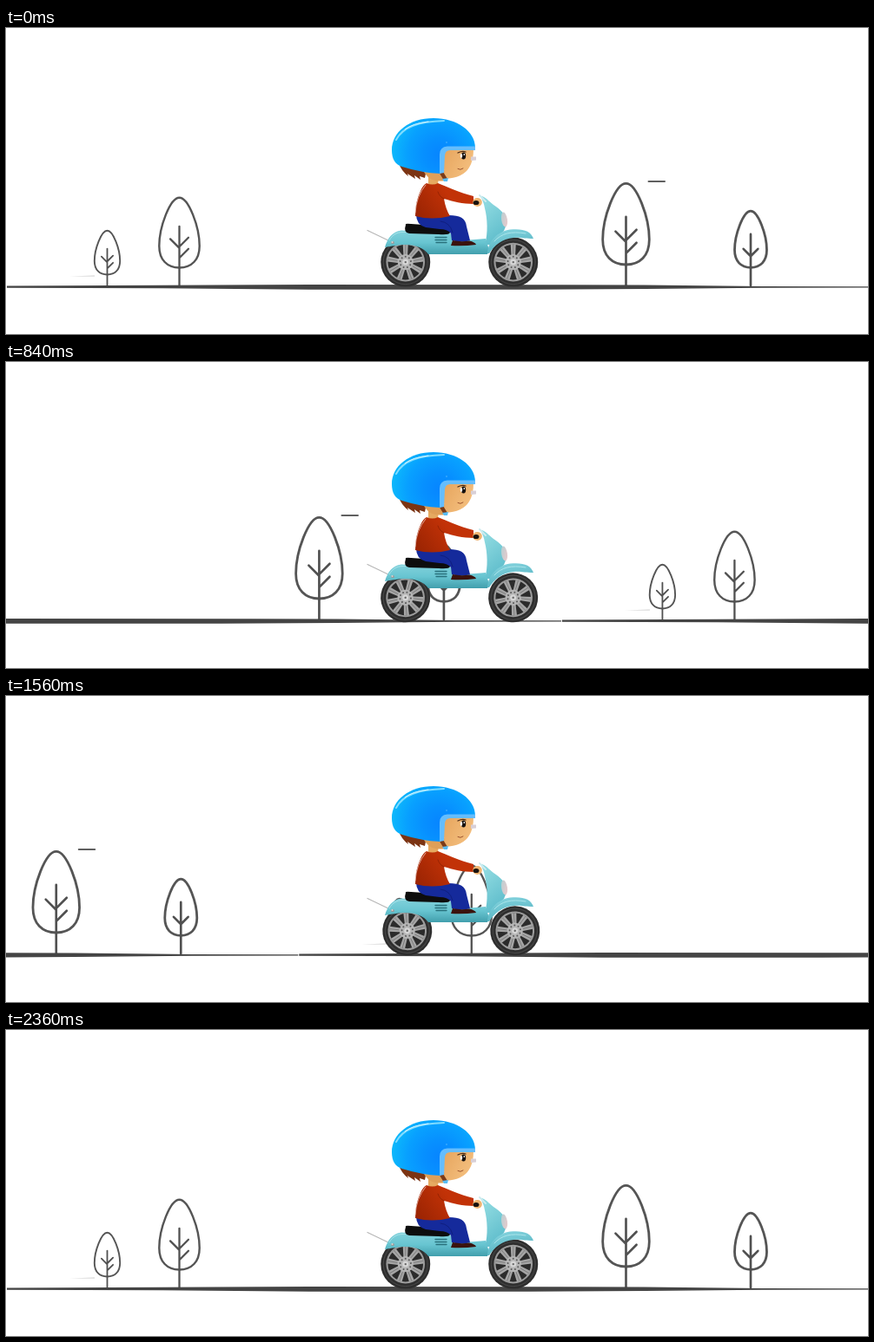
An HTML page with a canvas that plays this animation: 992x353 px, repeating every 2.4 s.

```html
<!DOCTYPE html>
<html lang="en">
<head>
<meta charset="utf-8">
<title>Scooter ride</title>
<style>
  html, body { margin: 0; width: 100%; height: 100%; overflow: hidden; background: #fff; }
  canvas { display: block; }
</style>
</head>
<body>
<canvas id="stage" width="992" height="353"></canvas>
<script>
const ctx = document.getElementById('stage').getContext('2d');
const WIDTH = 992, HEIGHT = 353, LOOP = 2400, STEP = 40;
const LAST = LOOP / STEP - 1;

function fill(path, style) {
  ctx.fillStyle = style;
  ctx.fill(new Path2D(path));
}

function stroke(path, style, width) {
  ctx.strokeStyle = style;
  ctx.lineWidth = width;
  ctx.stroke(new Path2D(path));
}

function ellipse(x, y, rx, ry, style, angle = 0) {
  ctx.fillStyle = style;
  ctx.beginPath();
  ctx.ellipse(x, y, rx, ry, angle, 0, Math.PI * 2);
  ctx.fill();
}

function addStops(gradient, colors) {
  colors.forEach((c, i) => gradient.addColorStop(i / (colors.length - 1), c));
  return gradient;
}

const linear = (x0, y0, x1, y1, ...colors) =>
  addStops(ctx.createLinearGradient(x0, y0, x1, y1), colors);
const radial = (x, y, r, ...colors) =>
  addStops(ctx.createRadialGradient(x, y, 0, x, y, r), colors);

const paint = {
  helmet: radial(499, 146, 56, '#0785ff', '#0790ff', '#08a0ff', '#0cb9fb'),
  skin: linear(504, 145, 538, 165, '#e7a760', '#f5c181'),
  shirt: linear(474, 212, 506, 188, '#9d2503', '#c23207'),
  body: linear(0, 233, 0, 262, '#83d2dc', '#68c5d1', '#3f9caa'),
  shield: linear(550, 205, 575, 235, '#8cd8df', '#62bfcd'),
  fender: linear(570, 233, 575, 260, '#82d2dd', '#55b3c1'),
  lamp: linear(569, 220, 579, 222, '#b9cfd2', '#ecc9cb')
};

// Twigs are [side, height of the joint as a share of the crown].
const uneven = [[1, 0.7], [-1, 0.72], [1, 0.86]];
const even = [[1, 0.8], [-1, 0.8]];
const trees = [
  { x: 713.5, top: 179.3, bottom: 273, half: 26.8, line: 2.8, twigs: uneven },
  { x: 199.5, top: 195.7, bottom: 276.5, half: 23.2, line: 2.4, twigs: uneven },
  { x: 857, top: 211.2, bottom: 276.3, half: 18.5, line: 2.8, twigs: even },
  { x: 116.5, top: 233.7, bottom: 284.5, half: 14.7, line: 1.9, twigs: uneven }
];

function drawTree({ x, top, bottom, half, line, twigs }) {
  const h = bottom - top, wide = top + h * 0.69;
  const side = s => `M${x} ${top}C${x + s * half * 0.46} ${top} ${x + s * half} ${top + h * 0.42} ` +
    `${x + s * half} ${wide}C${x + s * half} ${top + h * 0.89} ${x + s * half * 0.6} ${bottom} ${x} ${bottom}`;
  const twig = ([s, y]) => `M${x} ${top + h * y}L${x + s * half * 0.45} ${top + h * (y - 0.13)}`;
  stroke(side(-1) + side(1), '#555', line);
  stroke(`M${x} ${top + h * 0.41}V297` + twigs.map(twig).join(''), '#505050', line * 0.95);
}

function drawScenery() {
  trees.forEach(drawTree);
  fill('M73 286.5L102 285.5V286.6Z', '#ccc');
  fill('M1 297.4L180 296.7L350 296L640 296.2L735 296.6L870 298L992 298.3V299.4L870 299.7' +
    'L735 301L600 301.7L350 301.7L180 300.2L1 299.8Z', '#444');
}

function drawWheel(x, y, angle) {
  ctx.save();
  ctx.translate(x, y);
  ctx.rotate(angle);
  ellipse(0, 0, 28.5, 28.5, '#2e2e2e');
  ctx.lineWidth = 1;
  ctx.strokeStyle = '#484848';
  ctx.beginPath();
  ctx.arc(0, 0, 25.5, 0, Math.PI * 2);
  ctx.stroke();
  ellipse(0, 0, 22.3, 22.3, '#9c9c9c');
  ellipse(0, 0, 20.3, 20.3, '#2b2b2b');
  for (let i = 0; i < 9; i++) {
    fill('M-2.2 -5L-3 -20.5H3L2.2 -5Z', '#a6a6a6');
    stroke('M0 -10V-20', '#777', 0.8);
    ctx.rotate(Math.PI * 2 / 9);
  }
  ellipse(0, 0, 9, 9, '#b5b5b5');
  for (let i = 0; i < 9; i++) {
    ellipse(0, -6.3, 1, 1, '#5a5a5a');
    ctx.rotate(Math.PI * 2 / 9);
  }
  ellipse(0, 0, 3.5, 3.5, '#d6d6d6');
  ellipse(0, 0, 1.2, 1.2, '#666');
  ctx.restore();
}

function drawScooter() {
  stroke('M416 233.5L444 247', '#b8b8b8', 1.3);
  fill('M436 253C439 243 444 235 455 233.5L512 237L515 246L552 243L556 256L554 261H486' +
    'C481 254 472 250 460 250C450 250 444 252 436 253Z', paint.body);
  stroke('M441 245C446 237 451 235 460 235.5', '#a6e2e8', 1);
  fill('M546 194C550 193 555 199 561 204C569 209 575 215 577 224L573 234L557 250H551' +
    'C555 237 554 219 551 208C550 202 548 198 546 194Z', paint.shield);
  fill('M554 260C555 246 565 235 580 232.5C595 231 604 234 607 243C597 243 592 241 584 242' +
    'C571 243 562 251 556 260Z', paint.fender);
  stroke('M562 246C570 237 581 234 598 237', '#abe5eb', 1);
  ellipse(573.5, 221, 3.4, 8.5, paint.lamp, -0.15);
  stroke('M545 193L552 200', '#cdebef', 2);
  stroke('M494 241.5H507M494 244.5H507M495 247.5H507', '#28717c', 1.3);
  ellipse(445, 247.5, 2, 1.6, '#999');
  ellipse(444.5, 247, 1, 0.8, '#eee');
}

function drawRider() {
  fill('M460 227Q459 225 466 226L511 229V236Q510 239 498 238L464 237Q457 236 460 227Z', '#0d0d0d');
  fill('M472 215L510 216C522 216 529 219 530 229L534 245Q524 248 513 245L512 237' +
    'Q508 232 499 232L483 230Q472 227 472 215Z', '#152a9b');
  stroke('M500 223Q511 224 514 236', '#0e1c78', 0.8);
  fill('M514 245Q523 247 533 245.5Q540 247 541 250Q526 252 512 251Z', '#3b130e');

  fill('M486 171H498L497 181H486Z', '#e6a960');
  fill('M484 179Q491 182 497 179C508 183 521 190 538 194V203C526 203 514 200 504 197' +
    'Q506 209 511 217Q490 222 471 217Q471 200 477 188Q480 181 484 179Z', paint.shirt);
  stroke('M471 213Q472 194 483 181', '#e9c3bb', 0.8);
  stroke('M497 189Q499 195 504 197', '#8d2002', 0.8);
  ellipse(542.5, 201, 5.3, 5, '#efb471');
  ellipse(541, 201.5, 3.4, 2.6, '#18120f');
}

function drawHead() {
  fill('M452 156L484 163L482 173L476 171L477 175L470 170L471 174L462 168L463 171Q455 165 452 156Z', '#7c3413');
  fill('M480 164H505V176Q487 179 480 164Z', '#df9f58');
  fill('M502 140H538Q538 153 533 161Q526 173 505 174Z', paint.skin);
  fill('M535 148.5H541V152.5L535 153Z', '#d9d0d7');
  fill('M498 166L503 166L508 174L504 176Z', '#7b3b18');
  fill('M502 174L509 173L508 177H504Z', '#58bdf4');

  fill('M540 138C540 119 519 104 492 104C464 104 444 120 444 141C444 151 448 158 456 160' +
    'Q478 167 500 168L502 142L507 138Z', paint.helmet);
  fill('M540 136.5V141H511Q505.5 141 505 147L504 167L499 168V146Q499 137 508 136.5Z', '#65bdfd');
  stroke('M449 129C457 114 474 108 504 107', '#7fdcff', 2);
  stroke('M459 117Q468 110 486 108', '#d4f5ff', 1);
  ellipse(507, 132, 0.8, 0.8, '#58baff');

  stroke('M520 144Q525 141.5 529 143', '#4c2b16', 1.3);
  ellipse(526.5, 147.5, 2.7, 4, '#16100e');
  ellipse(524, 147.5, 1.2, 2.4, '#fff');
  ellipse(527.3, 146, 0.8, 1, '#fff');
  stroke('M520 162.5Q523 164.5 526 162', '#9c5430', 1);
}

function draw(now) {
  const step = Math.floor((now % LOOP) / STEP);
  const phase = step / LAST;
  const shift = phase * WIDTH;
  const angle = phase * Math.PI * 4;

  ctx.fillStyle = '#fff';
  ctx.fillRect(0, 0, WIDTH, HEIGHT);
  for (const copy of [0, 1]) {
    ctx.save();
    ctx.translate(copy * WIDTH - shift, 0);
    drawScenery();
    // Only the first stretch of road carries the floating dash.
    if (copy === 0) stroke('M739.5 177H758', '#606060', 2);
    ctx.restore();
  }

  // The wheels spin slightly off their axles.
  const orbit = angle + 4.1;
  const dx = 1.3 * Math.cos(orbit), dy = 1.1 * Math.sin(orbit);
  for (const axle of [460.5, 584.5]) drawWheel(axle + dx, 271 + dy, angle);

  drawScooter();
  drawRider();
  drawHead();
}

ctx.lineCap = 'round';
ctx.lineJoin = 'round';
const start = performance.now();
function tick() {
  draw(performance.now() - start);
  requestAnimationFrame(tick);
}
tick();
</script>
</body>
</html>
```
